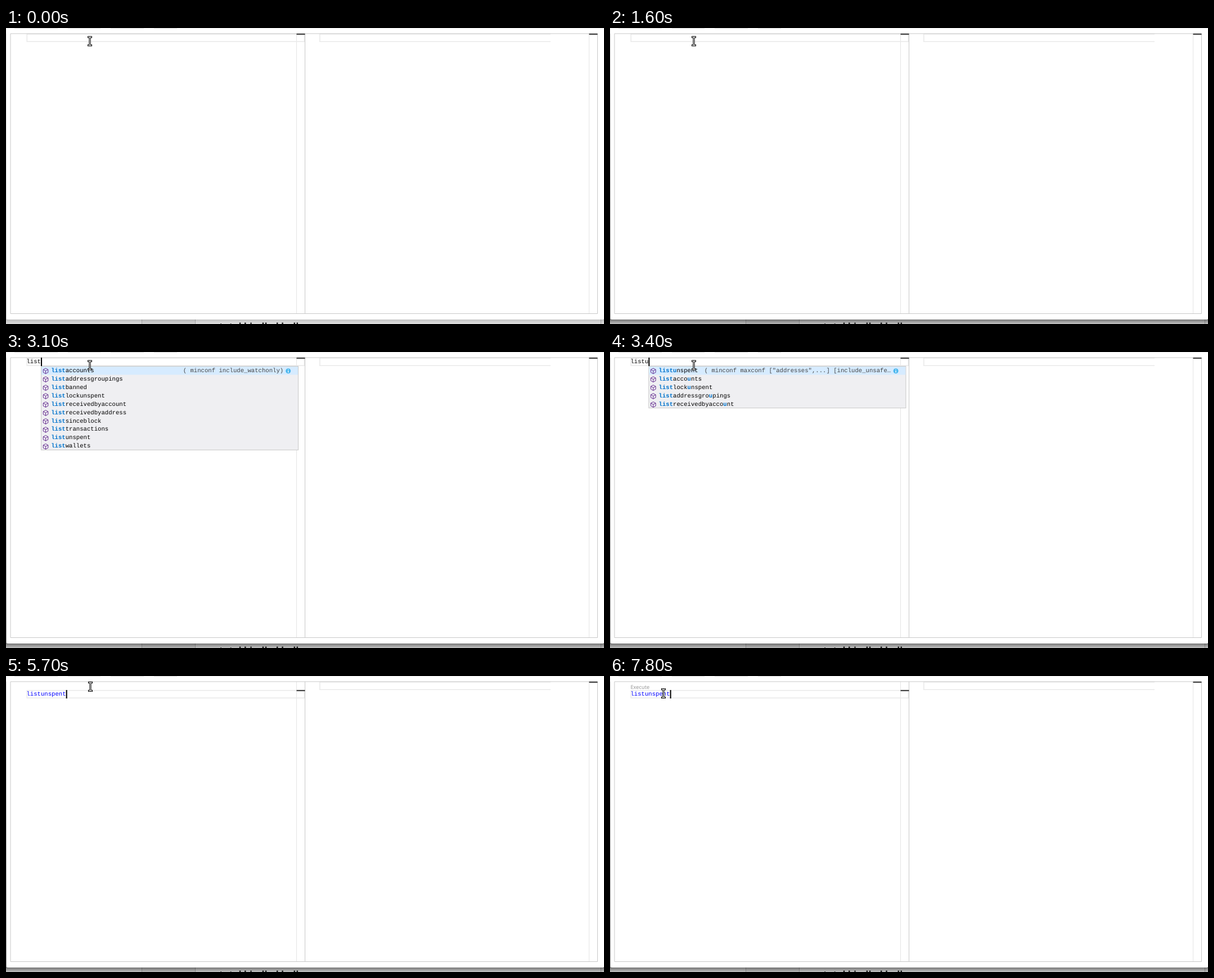
Animation of 1063x527 px, one loop 8 s. Source, as an HTML page:

```html
<!DOCTYPE html>
<html lang="en">
<head>
<meta charset="utf-8">
<title>Command editor</title>
<style>
  html, body { margin: 0; width: 100%; height: 100%; overflow: hidden; background: #fff; }
  svg { display: block; width: 1063px; height: 527px; }
  text { white-space: pre; text-rendering: geometricPrecision; }
  .code { font: 10.63px "Liberation Mono", "Courier New", monospace; }
  .hit { font-weight: bold; fill: #0073cc; }
  .lens { font: 9.3px "Noto Sans", "Open Sans", sans-serif; fill: #999; }
  .page { font: bold 16.5px "Open Sans", sans-serif; fill: #222; }
  .line { fill: none; stroke: #eaeaea; stroke-width: 1.6; }
  .mark { fill: #424242; }
</style>
</head>
<body>
<svg id="stage" viewBox="0 0 1063 527">
  <defs>
    <linearGradient id="drop" x1="0" y1="0" x2="0" y2="1">
      <stop offset="0" stop-opacity=".55"/>
      <stop offset="1" stop-opacity=".2"/>
    </linearGradient>
    <linearGradient id="side" x1="0" y1="0" x2="0" y2="1">
      <stop offset="0" stop-opacity=".1"/>
      <stop offset="1" stop-opacity=".4"/>
    </linearGradient>
    <path id="beam" d="M-2.4-7.4h1.6L0-6.6L.8-7.4H2.4M0-6.6V6.6M-2.4 7.4h1.6L0 6.6L.8 7.4H2.4"/>
  </defs>

  <!-- page behind the dialog -->
  <rect width="1063" height="527" fill="#f0f0f0"/>
  <rect x="241" y="510" width="96" height="17" fill="#e6e6e6"/>
  <rect x="337" y="510" width="720" height="17" fill="#f4f4f4"/>
  <path d="M241.5 510v17M336.5 510v17M1057.5 510v17" stroke="#bbb"/>
  <text class="page" x="379" y="537">total kindled bulk</text>
  <g id="shade">
    <rect y="518" width="1063" height="9" fill="url(#drop)"/>
    <rect y="10" width="1" height="508" fill="url(#side)"/>
  </g>

  <!-- dialog and its two panes -->
  <path d="M1 0H1063V517q0 2-2 2H3q-2 0-2-2z" fill="#fff"/>
  <path d="M0 .5H1063" stroke="#eee"/>
  <path d="M15 .5h77M110 .5h58M186 .5h59M263 .5h41" stroke="#d4d4d4"/>
  <path d="M516.5 10v498M1036.5 10v498" stroke="#e4e4e4"/>
  <rect id="line" class="line" x="37.3" y="10.8" width="493" height="13.4"/>
  <path class="line" d="M968 10.8H557.8V24.2H968"/>
  <path d="M8 10H1051.5V508.5H8V10M531.5 10V508" fill="none" stroke="#c8c8c8"/>
  <rect id="mark" class="mark" x="516.5" y="9.9" width="15" height="2.2"/>
  <rect class="mark" x="1036.5" y="9.9" width="15" height="2.2"/>

  <text id="lens" class="lens" x="36.4" y="23">Execute</text>
  <text id="typed" class="code" x="36.4" y="20.1"></text>
  <rect id="caret" y="10" width="2" height="15"/>
  <g id="menus"></g>
  <g id="pointer" fill="none" stroke-linecap="square">
    <use href="#beam" stroke="#000" stroke-width="3.2"/>
    <use href="#beam" stroke="#fff" stroke-width="1.1"/>
  </g>
</svg>
<script>
const LOOP = 8000, CHAR = 6.38, ROW = 14.94, LEFT = 36.5;
const $ = id => document.getElementById(id);

function set(node, attrs) {
  for (const key in attrs) node.setAttribute(key, attrs[key]);
}

function add(parent, tag, attrs, content) {
  const node = document.createElementNS("http://www.w3.org/2000/svg", tag);
  set(node, attrs);
  if (content) node.textContent = content;
  parent.append(node);
  return node;
}

// Parts of a label inside * marks are the matched letters.
function addMenu(x, labels, detail, detailX) {
  const menu = add($("menus"), "g", { transform: `translate(${x} 25)` });
  const height = labels.length * ROW - 0.5;
  add(menu, "rect", { x: 0.5, y: 0.5, width: 457, height, fill: "#efeff2", stroke: "#c8c8c8" });
  add(menu, "rect", { x: 1, y: 1, width: 456, height: 14.5, fill: "#d6ebff" });
  labels.forEach((label, i) => {
    const y = i * ROW;
    add(menu, "path", {
      d: "M0-4.8L4.3-2.5V2.5L0 4.8L-4.3 2.5V-2.5ZM-4.3-2.5L0-.2L4.3-2.5M0-.2V4.8",
      transform: `translate(8.5 ${y + 8.8})`,
      fill: "none", stroke: "#652d90", "stroke-linejoin": "round"
    });
    const text = add(menu, "text", { class: "code", x: 18.2, y: y + 10.9 });
    label.split("*").forEach((part, k) => {
      if (part) add(text, "tspan", k % 2 ? { class: "hit" } : {}, part);
    });
  });
  add(menu, "text", { class: "code", x: detailX - x, y: 10.9, fill: "#444" }, detail);
  add(menu, "circle", { cx: 439.7, cy: 8.8, r: 4.5, fill: "#4db8ee" });
  add(menu, "path", { d: "M439.7 5.8v1.2M439.7 8v3.8", stroke: "#fff", "stroke-width": 1.3 });
  return menu;
}

const endings = ["accounts", "addressgroupings", "banned", "lockunspent", "receivedbyaccount",
  "receivedbyaddress", "sinceblock", "transactions", "unspent", "wallets"];
const menus = {
  list: addMenu(62, endings.map(e => "*list*" + e), "( minconf include_watchonly)", 314.7),
  listu: addMenu(68.4, ["*listu*nspent", "*list*acco*u*nts", "*list*lock*u*nspent",
    "*list*addressgro*u*pings", "*list*receivedbyacco*u*nt"],
    '( minconf maxconf ["addresses",...] [include_unsafe…', 167.7)
};

// Each track holds [start time, value] steps.
const tracks = {
  typed: [[0, ""], [3100, "list"], [3400, "listu"], [5700, "listunspent"]],
  caret: [[0, 0], [1100, 1], [1600, 0], [2100, 1], [4100, 0], [4400, 1], [6100, 0], [6500, 1]],
  shade: [[0, 0.4], [1100, 1]],
  lens: [[0, 0], [6500, 0.45], [6900, 1]],
  pointer: [[0, [149, 23.5]], [4400, [150, 19]], [6900, [150, 21]], [7500, [101, 31]], [7800, [95, 31]]]
};
const at = (name, t) => tracks[name].findLast(step => step[0] <= t)[1];

function draw(t) {
  const typed = at("typed", t);
  const done = typed === "listunspent";
  const transform = `translate(0 ${done ? ROW : 0})`;
  $("typed").textContent = typed;
  set($("typed"), { transform, fill: done ? "#00f" : "#000" });
  set($("line"), { transform });
  set($("mark"), { transform });
  set($("caret"), { transform, x: LEFT + typed.length * CHAR, opacity: at("caret", t) });
  set($("shade"), { opacity: at("shade", t) });
  set($("lens"), { opacity: at("lens", t) });
  set($("pointer"), { transform: `translate(${at("pointer", t)})` });
  for (const key in menus) menus[key].style.display = key === typed ? "" : "none";
}

const start = performance.now();
function tick() {
  draw((performance.now() - start) % LOOP);
  requestAnimationFrame(tick);
}
tick();
</script>
</body>
</html>
```
